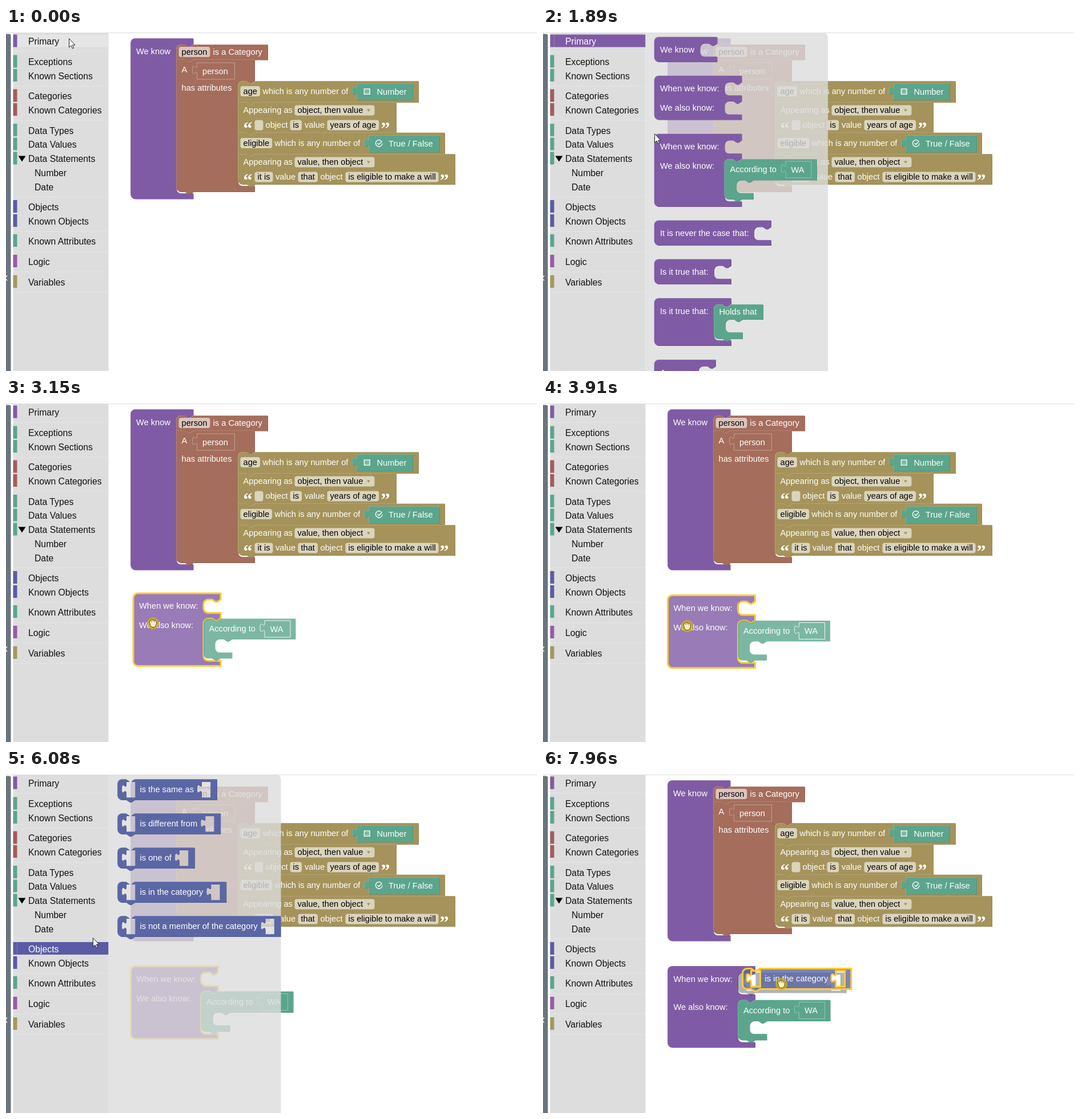
These frames come from a looping animation (930 px wide and 602 px high, 8 s). An HTML page:

```html
<!DOCTYPE html>
<html lang="en">
<head>
<meta charset="utf-8">
<title>Block editor</title>
<style>
  html, body { margin: 0; width: 100%; height: 100%; overflow: hidden; background: #fff; }
  svg { display: block; }
  text { font: 14.67px "Liberation Sans", Arial, sans-serif; fill: #fff; }
  text.dark { fill: #000; }
  text.quote { font: bold 32px "Liberation Serif", serif; }
  .toolbox text { font-size: 15.75px; fill: #111; }
  .edge { fill: none; stroke: #fff; stroke-opacity: .35; }
  .sel > .main { stroke: #fc3; stroke-width: 3; }
  .drag .main { fill-opacity: .8; }
  .drag .shade { display: none; }
  .drag .edge { stroke-opacity: .9; }
</style>
</head>
<body>
<svg id="stage" width="930" height="602" viewBox="0 0 930 602"></svg>
<script>
const PURPLE = '#805ba5', BROWN = '#a56d5b', OLIVE = '#a5935b', GREEN = '#5ba58c',
      RED = '#a55b5b', INDIGO = '#5b5ba5', BLUE = '#5b67a5';
const NOTCH_BACK = 'l-6,4 -3,0 -6,-4';

const pen = document.createElement('canvas').getContext('2d');
pen.font = '14.67px "Liberation Sans", Arial, sans-serif';
const widthOf = s => pen.measureText(s).width;

// ---- markup helpers ----
const text = (x, y, s, cls = '') => `<text x="${x}" y="${y}" class="${cls}">${s}</text>`;
const group = (x, y, inner, id = '') => `<g id="${id}" transform="translate(${x},${y})">${inner}</g>`;
const rect = (x, y, w, h, fill, more = '') =>
  `<rect x="${x}" y="${y}" width="${w}" height="${h}" fill="${fill}" ${more}/>`;

const chip = (x, y, s, w = widthOf(s) + 10) =>
  rect(x, y - 13.5, w, 18, '#fff', 'rx="4" fill-opacity=".6"') + text(x + 5, y, s, 'dark');
const dropdown = (x, y, s) => chip(x, y, s, 140) +
  `<path d="M${x + 126.5},${y - 6.5}h6l-3,4.5z" fill="${OLIVE}"/>`;

// Rows are [width, height]; a third entry marks a statement cavity starting at that x.
function outline(rows, { square, prev, next } = {}) {
  let d = square ? 'M0,0' : 'M0,8a8,8 0 0 1 8,-8';
  if (prev) d += 'H15l6,4 3,0 6,-4';
  for (const [w, h, cavity] of rows) {
    d += cavity
      ? `H${w + 30}${NOTCH_BACK}h-7a8,8 0 0 0 -8,8v${h - 16}a8,8 0 0 0 8,8`
      : `H${w}v${h}`;
  }
  if (next) d += 'H30' + NOTCH_BACK;
  return d + (next === 'flat' ? 'H0Z' : 'H8a8,8 0 0 1 -8,-8Z');
}

// Dark and light copies peek out by half a pixel to give the embossed edge.
const layers = (color, d) => {
  const layer = (shift, fill, cls) =>
    `<path d="${d}" class="${cls}" fill-rule="evenodd" transform="translate(${shift},${shift})" style="fill:${fill}"/>`;
  return layer(.5, `color-mix(in srgb, ${color}, #000 20%)`, 'shade') +
    layer(-.5, `color-mix(in srgb, ${color}, #fff 30%)`, 'shade') +
    layer(0, color, 'main');
};
const block = (x, y, color, d, inner = '', id = '') => group(x, y, layers(color, d) + inner, id);

const valuePath = (w, h) =>
  `M0,0H${w}V${h}H0V20c0,-10 -8,8 -8,-7.5s8,2.5 8,-7.5Z`;
const slot = (x, y, w, s) =>
  group(x, y, `<path class="edge" d="${valuePath(w, 29)}"/>` + text(9.5, 19.5, s));

const cBlock = (x, y, label, w, cavity = 23.5, inner = '') =>
  block(x, y, PURPLE, outline([[w, 11], [w - 30, cavity, 1], [w, 9]]), text(10, 27, label) + inner);

const accordingTo = y => block(123, y, GREEN,
  outline([[161.5, 36.5], [20.5, 23, 1], [50.5, 10.5]], { prev: 1, next: 1 }),
  text(9.5, 22.5, 'According to') + slot(107, 3.5, 45, 'WA'));

const whenPath = (first, second) => outline(
  [[153, 11], [123, first, 1], [153, 10], [123, second, 1], [153, 9]]);
const whenBlock = (grow = 0) =>
  layers(PURPLE, whenPath(23.5 + grow, 74)) + text(10, 27, 'When we know:') +
  text(10, 61 + grow, 'We also know:') + accordingTo(44.5 + grow);

// Two empty value inputs around a label.
const hole = x => `M${x + 16},4h-16v5c0,10 -8,-8 -8,7.5s8,-2.5 8,7.5v8h16z`;
function relationPath(label) {
  const w = widthOf(label) + 79.5;
  return outline([[w, 36]], { prev: 1, next: 1 }) + hole(15) + hole(w - 27);
}
const relation = label => layers(BLUE, relationPath(label)) + text(39, 22.5, label);

// ---- fixed parts ----
const ROWS = [
  ['Primary', 24, PURPLE], ['Exceptions', 60, GREEN], ['Known Sections', 84.5, GREEN],
  ['Categories', 120, RED], ['Known Categories', 144.5, RED], ['Data Types', 180.5, GREEN],
  ['Data Values', 205, GREEN], ['Data Statements', 230, GREEN], ['Number', 254.5],
  ['Date', 279.5], ['Objects', 314.5, INDIGO], ['Known Objects', 339.5, INDIGO],
  ['Known Attributes', 374.5, GREEN], ['Logic', 410.5, '#995ba5'], ['Variables', 446.5, '#a5985b']
];
const toolbox = '<g class="toolbox">' + rect(13, 9, 167, 594, '#ddd') +
  [41, 102, 162, 296, 357, 393, 428, 464].map(y => rect(13, y, 167, 1, '#e5e5e5')).join('') +
  ROWS.map(([name, y, color]) =>
    rect(20, y - 12, 160, 22, 'none', `id="row${name.replace(' ', '')}"`) +
    (color ? rect(13, y - 12, 7, 22, color) : '') +
    `<text id="label${name.replace(' ', '')}" x="${color ? 39.5 : 50.5}" y="${y + 5.5}">${name}</text>`
  ).join('') + '<path d="M22,225h13l-6.5,10z"/></g>';

const frame = rect(0, 8.5, 931, 1, '#ddd') +
  '<path d="M0,11h6q3,0 3,3V603H0z" fill="#6a747e"/>' +
  '<path d="M2.5,435L-1,439.5L2.5,444" fill="none" stroke="#fff" stroke-width="1.3"/>';

const quotes = (y, end) => text(416, y + 12, '“', 'quote') + text(end, y + 12, '”', 'quote');
const olive = (y, w, h, opts) => block(407, y, OLIVE, outline([[w, h]], { prev: 1, ...opts }));
const middle = { square: 1, next: 'flat' };

const workspace =
  block(219, 19, PURPLE, outline([[109.5, 11], [80, 261, 1], [109.5, 9.5]])) + text(228.5, 46, 'We know') +
  block(299, 30, BROWN, outline([[160, 26.5]], { prev: 1, next: 'flat' })) +
  chip(303, 47, 'person') + text(363, 47, 'is a Category') +
  block(299, 56.5, BROWN, outline([[137, 37.5], [108, 184, 1], [137, 10]], { square: 1, prev: 1, next: 1 })) +
  text(308, 78, 'A') + slot(335, 61.5, 66, 'person') + text(308, 110.5, 'has attributes') +
  olive(94, 316, 37, { next: 'flat' }) + olive(131, 277, 53.5, middle) +
  olive(184.5, 362, 37.5, middle) + olive(222, 380, 53, { square: 1, next: 1 }) +
  chip(411, 116, 'age') + text(450, 116, 'which is any number of') +
  block(615, 98, GREEN, valuePath(98, 29)) + text(650, 117.5, 'Number') +
  '<path d="M628,107.500h9.500v9h-9.500zM631,110v1.500M634.500,110v1.500M631,113v1.500M634.500,113v1.500" fill="none" stroke="#fff" stroke-width="1.5"/>' +
  text(416, 149.5, 'Appearing as') + dropdown(506, 149.5, 'object, then value') +
  quotes(175.5, 657) + chip(436, 175.5, '', 15) + text(455, 175.5, 'object') + chip(498, 175.5, 'is') +
  text(523.5, 175.5, 'value') + chip(563, 175.5, 'years of age') +
  chip(411, 207, 'eligible') + text(471, 207, 'which is any number of') +
  block(636, 189.5, GREEN, valuePath(124, 29)) + text(670.5, 208.5, 'True / False') +
  '<path d="M659.500,203a5.800,5.800 0 1 1 -2,-4.500M651,202.500l2.500,2.500 5.500,-6" fill="none" stroke="#fff" stroke-width="1.4"/>' +
  text(416, 240.5, 'Appearing as') + dropdown(506, 240.5, 'value, then object') +
  quotes(266.5, 760) + chip(436, 266.5, 'it is') + text(472.5, 266.5, 'value') + chip(512, 266.5, 'that') +
  text(551, 266.5, 'object') + chip(595, 266.5, 'is eligible to make a will');

const flyout = (id, right, inner) => `<g id="${id}"><path d="M180,9H${right - 8}a8,8 0 0 1 8,8V603H180z"
  fill="#ddd" fill-opacity=".8"/>${inner}</g>`;

const holds = block(104.5, 11, GREEN, outline([[86, 26], [20, 23, 1], [50, 11]], { prev: 1, next: 1 }),
  text(9, 17.5, 'Holds that'));
const primaryFlyout = flyout('primary', 499.5,
  cBlock(195.5, 16.5, 'We know', 110) +
  block(195.5, 84.5, PURPLE, whenPath(23.5, 23.5), text(10, 27, 'When we know:') + text(10, 61, 'We also know:')) +
  group(195.5, 186.5, whenBlock(), 'pickWhen') +
  cBlock(195.5, 338.5, 'It is never the case that:', 204.5) +
  cBlock(195.5, 406.5, 'Is it true that:', 134.5) +
  cBlock(195.5, 475, 'Is it true that:', 134.5, 63, holds) +
  cBlock(195.5, 583, 'Assume', 107.5));

const RELATIONS = ['is the same as', 'is different from', 'is one of', 'is in the category',
  'is not a member of the category'];
const objectsFlyout = flyout('objects', 482, RELATIONS.map((label, i) =>
  group(196, 17 + 60 * i, relation(label), i === 3 ? 'pickCat' : '')).join(''));

const ghost = `<path d="${relationPath(RELATIONS[3])}" fill-rule="evenodd" fill-opacity=".3"/>`;
const cursor = `<g id="cursor">
  <path id="arrow" d="M0,0V15.500L3.600,12.300L6,17.500L8.200,16.500L5.900,11.400H10.500Z" fill="#fff" stroke="#222"/>
  <g id="hand"><circle id="press" r="10.5" fill="#d2b01c" fill-opacity=".8"/>
  <path d="M-6,-1q-1,-4 2,-4q1,-2 3,-1q2,-1 3,1q4,-1 4,3v3q-1,5 -4,6h-4q-3,-2 -4,-8z"
    fill="#fbf3bd" stroke="#55480f"/><path d="M-3,-5v3M0,-5.500v3M3,-4.500v3" stroke="#55480f" stroke-width=".8"/></g></g>`;

const stage = document.getElementById('stage');
stage.innerHTML = group(-.5, -.5, frame + toolbox + workspace + group(0, 0, whenBlock(), 'when') +
  group(219, 345, whenBlock(15) + group(123, 11, ghost), 'whenGrown') +
  group(0, 0, relation(RELATIONS[3]), 'cat') + primaryFlyout + objectsFlyout + cursor);

// ---- motion ----
const WHEN = [[2110, 195.5, 186.5], [2590, 215, 243.5], [2940, 223, 311], [3150, 223.5, 341.5],
  [3490, 220, 344], [3910, 219, 345]];
const CAT = [[6710, 196, 197], [7120, 201, 206], [7540, 299, 281], [7960, 350, 349]];
const POINTER = [[1330, 111, 19], [1890, 196, 186], [2110, 230, 243], [2590, 249.5, 300],
  [2940, 258, 366], [3150, 258, 394], [3490, 254.5, 397], [3910, 253, 399], [4510, 253, 399],
  [4930, 183, 340], [5210, 127, 310], [5940, 127, 310], [6710, 268, 229], [7120, 273, 239],
  [7540, 369, 310], [7960, 418, 376]];

function along(keys, t) {
  const i = keys.findIndex(k => k[0] > t);
  if (i < 1) return keys.at(i).slice(1);
  const [t0, x0, y0] = keys[i - 1], [t1, x1, y1] = keys[i], p = (t - t0) / (t1 - t0);
  return [x0 + (x1 - x0) * p, y0 + (y1 - y0) * p];
}

const el = id => document.getElementById(id);
const show = (id, on) => el(id).style.display = on ? '' : 'none';
const flag = (id, cls, on) => el(id).classList.toggle(cls, on);
const place = (id, pos) => el(id).setAttribute('transform', `translate(${pos})`);
function mark(name, color, hover, open) {
  el('row' + name).style.fill = open ? color : hover ? '#e5e5e5' : 'none';
  el('label' + name).style.fill = open ? '#fff' : '';
}
el('cat').classList.add('sel', 'drag');

function draw() {
  const t = performance.now() % 8000, within = (a, b) => t >= a && t < b;
  const primaryOpen = within(860, 2160), objectsOpen = within(5550, 6780);
  mark('Primary', PURPLE, t < 860, primaryOpen);
  mark('Objects', INDIGO, within(5130, 5550), objectsOpen);
  show('primary', primaryOpen);
  show('objects', objectsOpen);
  flag('pickWhen', 'sel', t >= 2080);
  flag('pickCat', 'sel', t >= 6680);

  const snapped = t >= 7750;
  show('when', t >= 2160 && !snapped);
  show('whenGrown', snapped);
  place('when', along(WHEN, t));
  flag('when', 'drag', t < 4110);
  flag('when', 'sel', t < 6780);

  show('cat', t >= 6780);
  place('cat', along(CAT, t));

  const grabbing = within(2080, 4110) || t >= 6680;
  const hand = grabbing || within(1960, 4720) || t >= 6400;
  place('cursor', along(POINTER, t));
  show('arrow', !hand);
  show('hand', hand);
  show('press', grabbing);
  requestAnimationFrame(draw);
}
draw();
</script>
</body>
</html>
```
